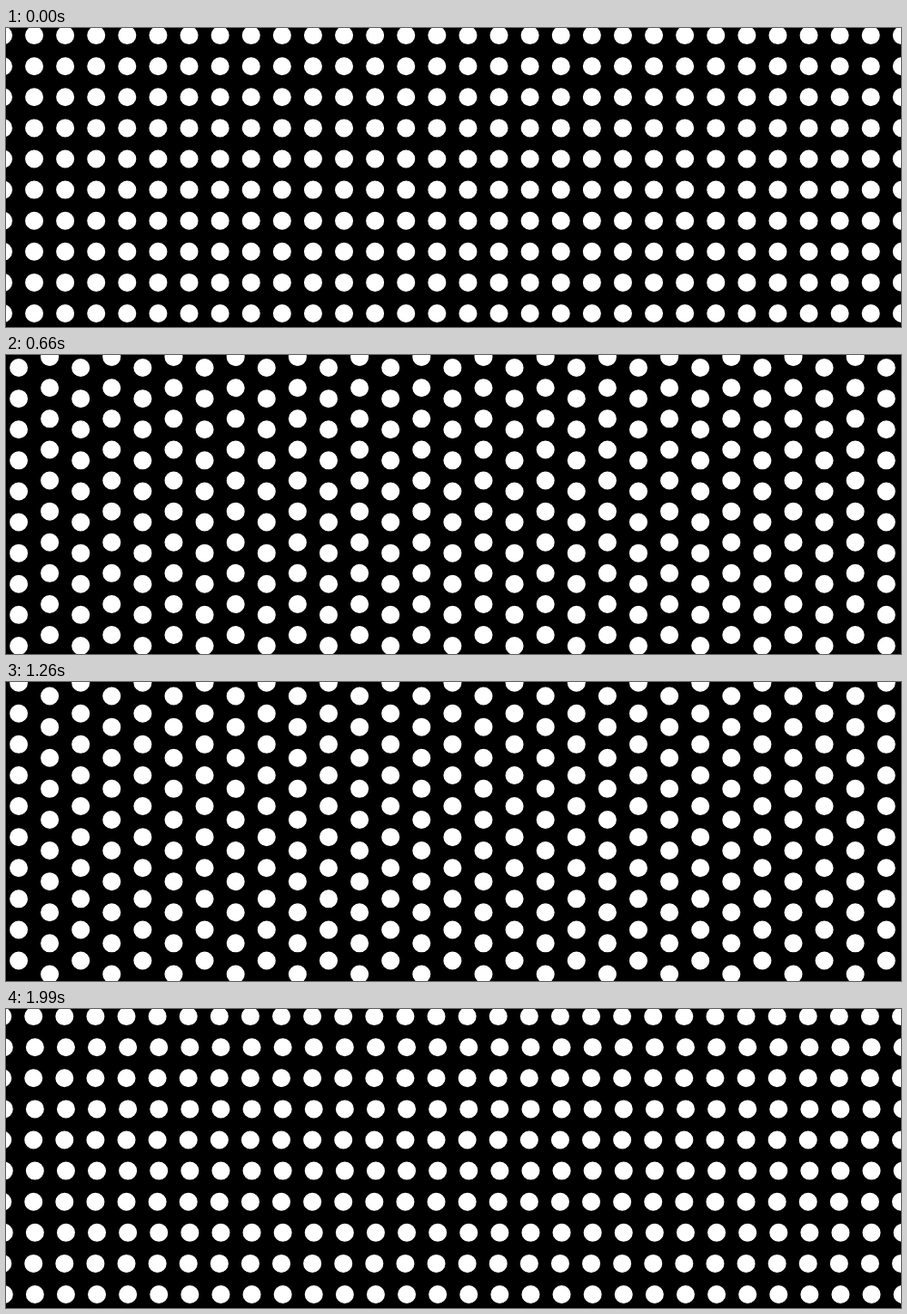
An HTML page without scripts for the animation above (2060 ms loop, 985 by 330 pixels).

```html
<!DOCTYPE html>
<html lang="en">
<head>
<meta charset="utf-8">
<title>Sliding dots</title>
<style>
  @property --i {
    syntax: "<number>";
    inherits: true;
    initial-value: 0;
  }

  html, body {
    margin: 0;
    width: 100%;
    height: 100%;
    overflow: hidden;
    background: #000;
  }

  svg {
    display: block;
    width: 985px;
    height: 330px;
    animation: tick 2060ms infinite;
    /* even lines slide by --s, odd lines the opposite way */
    --s: calc(17.05px - 2.3px * var(--i));
  }

  /* --i counts 31 ticks of about 1/15 s */
  @keyframes tick {
    0%     { --i: 0;  animation-timing-function: steps(1); }
    2.91%  { --i: 1;  animation-timing-function: steps(5); }
    18.93% { --i: 6;  animation-timing-function: steps(4); }
    32.03% { --i: 10; animation-timing-function: steps(6); }
    51.45% { --i: 16; animation-timing-function: steps(3); }
    61.16% { --i: 19; animation-timing-function: steps(5); }
    77.18% { --i: 24; animation-timing-function: steps(6); }
    96.6%  { --i: 30; animation-timing-function: steps(1); }
    100%   { --i: 31; }
  }

  /* each dot is a zero-length dash with round caps */
  path {
    fill: none;
    stroke: #fff;
    stroke-width: 20;
    stroke-linecap: round;
    stroke-dasharray: 0 34.1;
  }

  .right { transform: translateX(var(--s)); }
  .left  { transform: translateX(calc(-1 * var(--s))); }
  .down  { transform: translateY(calc(-1 * var(--s))); }
  .up    { transform: translateY(var(--s)); }

  /* columns cover the rows from tick 8 to tick 22 */
  .cols { opacity: clamp(0, min(var(--i) - 7, 23 - var(--i)), 1); }
</style>
</head>
<body>
<svg viewBox="0 0 985 330">
  <defs>
    <path id="row" d="M-88.3 8.1h1200m-1200 68.2h1200m-1200 68.2h1200m-1200 68.2h1200m-1200 68.2h1200"/>
    <path id="col" d="M14-94.2v600m68.2-600v600m68.2-600v600m68.2-600v600m68.2-600v600
      m68.2-600v600m68.2-600v600m68.2-600v600m68.2-600v600m68.2-600v600
      m68.2-600v600m68.2-600v600m68.2-600v600m68.2-600v600m68.2-600v600"/>
  </defs>
  <rect width="985" height="330"/>
  <g>
    <use class="right" href="#row"/>
    <use class="left" href="#row" y="34.1"/>
  </g>
  <g class="cols">
    <rect width="985" height="330"/>
    <use class="down" href="#col"/>
    <use class="up" href="#col" x="34.1"/>
  </g>
</svg>
</body>
</html>
```
